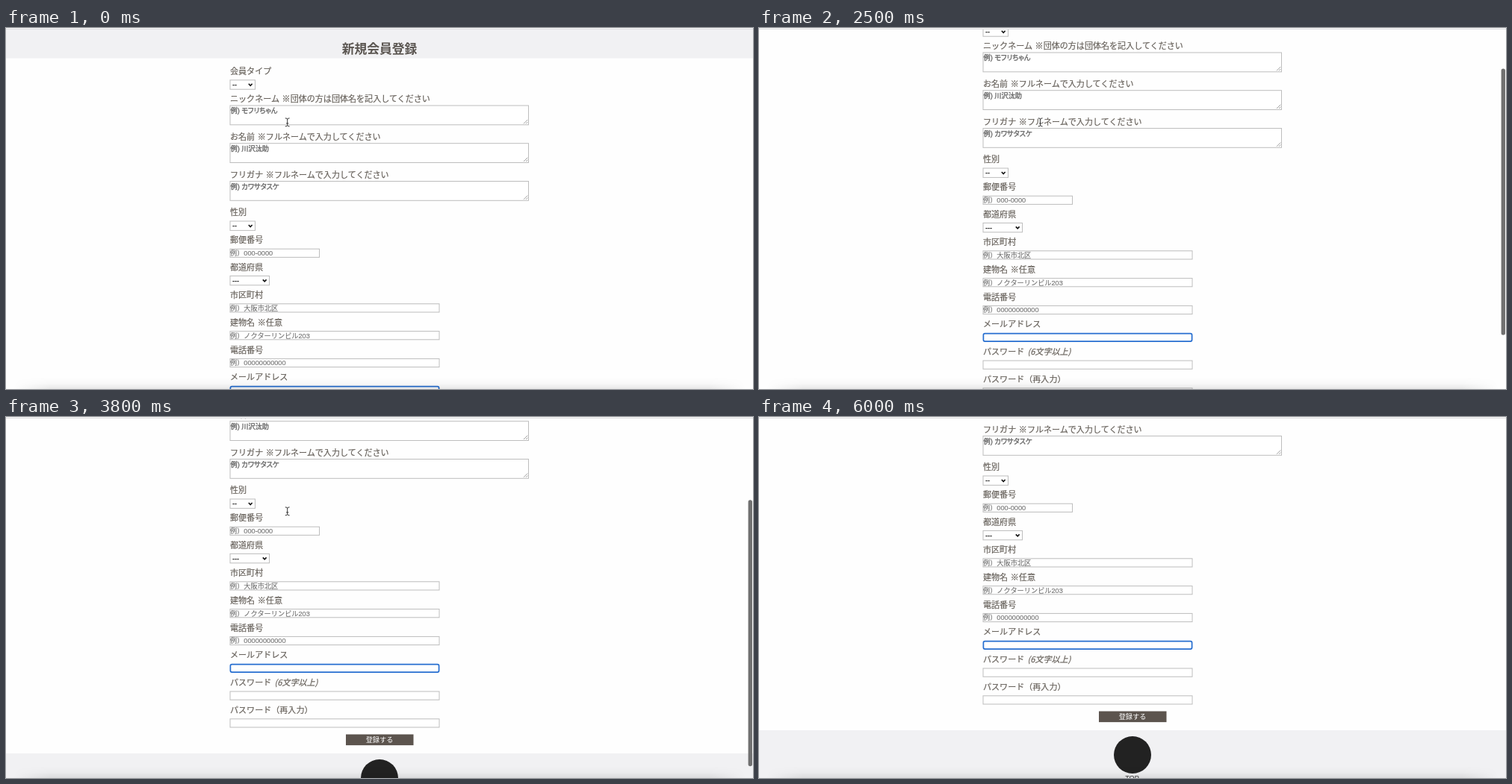
Write an HTML page that moves like this. It is 1000 by 484 pixels and loops after 6100 ms.

```html
<!DOCTYPE html>
<html lang="ja">
<head>
<meta charset="utf-8">
<title>新規会員登録</title>
<style>
html, body { margin: 0; width: 100%; height: 100%; overflow: hidden; background: #fefefe; }
svg { display: block; width: 1000px; height: 484px; }
text { font-family: "Noto Sans CJK JP", "Noto Sans CJK", sans-serif; white-space: pre; }
.title { font-size: 16.8px; font-weight: 700; fill: #5a5550; text-anchor: middle; }
.label { font-size: 11.05px; fill: #66605a; stroke: #66605a; stroke-width: .2; word-spacing: 1.2px; }
.hint { font-family: "Liberation Sans", "Noto Sans CJK JP", sans-serif; font-size: 9.2px; fill: #757575; stroke: #757575; stroke-width: .15; }
.tight { fill: #666; stroke: #666; stroke-width: .35; font-feature-settings: "palt"; }
.pick { font-family: "Liberation Sans", sans-serif; font-size: 9.2px; font-weight: 700; fill: #222; }
.button { font-size: 9.2px; font-weight: 500; fill: #fff; text-anchor: middle; }
.top { font-family: "Liberation Sans", sans-serif; font-size: 9.2px; fill: #333; text-anchor: middle; }
.box { fill: #fff; stroke: #bdbdbd; stroke-width: 1; }
</style>
</head>
<body>
<svg viewBox="0 0 1000 484">
  <defs>
    <linearGradient id="rise" x1="0" y1="0" x2="0" y2="1">
      <stop offset="0" stop-color="#000" stop-opacity="0"/>
      <stop offset=".5" stop-color="#000" stop-opacity=".02"/>
      <stop offset="1" stop-color="#000" stop-opacity=".09"/>
    </linearGradient>
    <linearGradient id="ends">
      <stop offset="0" stop-color="#000"/>
      <stop offset=".05" stop-color="#fff"/>
      <stop offset=".95" stop-color="#fff"/>
      <stop offset="1" stop-color="#000"/>
    </linearGradient>
    <mask id="fade"><rect x="10" y="464" width="980" height="20" fill="url(#ends)"/></mask>
  </defs>
  <rect width="1000" height="484" fill="#fefefe"/>
  <g id="page"></g>
  <rect width="1000" height="1" fill="#f8f8f8"/>
  <rect y="1" width="1000" height="1" fill="#dfdfe1"/>
  <rect x="10" y="468" width="980" height="16" fill="url(#rise)" mask="url(#fade)"/>
  <rect id="thumb" x="993.6" width="5.4" height="357" rx="2.7" fill="#707070"/>
  <g id="cursor" fill="none" stroke-linecap="round">
    <path id="beam" d="M-2.5-5.5Q0-5.5 0-4Q0-5.5 2.5-5.5M0-4V4M-2.5 5.5Q0 5.5 0 4Q0 5.5 2.5 5.5M-1.2 1.5H1.2"/>
  </g>
</svg>
<script>
const LOOP = 6100;
const $ = id => document.getElementById(id);
const page = $('page');

function add(tag, attrs, text) {
  const el = document.createElementNS('http://www.w3.org/2000/svg', tag);
  for (const k in attrs) el.setAttribute(k, attrs[k]);
  if (text) el.textContent = text;
  page.appendChild(el);
  return el;
}
const write = (cls, x, mid, size, text) => add('text', { class: cls, x, y: mid + size * 0.38 }, text);
const label = (y, text) => write('label', 300, y, 11.05, text);
const box = (y, w, h) => add('rect', { class: 'box', x: 300, y, width: w, height: h });

function input(mid, w, hint) {
  box(mid - 5.6, w, 11.2);
  if (hint) write('hint', 300, mid, 9.2, '例）' + hint);
}
function area(y, hint) {
  box(y, 399.5, 25.8);
  write('hint tight', 300.5, y + 7, 9.2, '例) ' + hint);
  add('path', { d: `M693 ${y + 24.3}l5.3-5.3M696 ${y + 24.3}l2.3-2.3`, stroke: '#888', 'stroke-width': 0.8 });
}
function select(mid, w, text) {
  box(mid - 6.2, w, 12.4);
  add('text', { class: 'pick', x: 303, y: mid + 3.2 }, text);
  add('path', { d: `M${291.3 + w} ${mid - 1.2}l2.4 2.5 2.4-2.5`, fill: 'none', stroke: '#111', 'stroke-width': 1.6 });
}

add('rect', { width: 1000, height: 40.5, fill: '#f1f1f3' });
write('title', 500, 28, 16.8, '新規会員登録');

label(58, '会員タイプ');
select(76, 33.5, '--');
label(95, 'ニックネーム ※団体の方は団体名を記入してください');
area(104, 'モフリちゃん');
label(146, 'お名前 ※フルネームで入力してください');
area(154.7, '川沢汰助');
label(196.6, 'フリガナ ※フルネームで入力してください');
area(205.5, 'カワサタスケ');
label(247.3, '性別');
select(265.2, 33.5, '--');

const row = i => 284.2 + 36.8 * i;
['郵便番号', '都道府県', '市区町村', '建物名 ※任意', '電話番号', 'メールアドレス', 'パスワード', 'パスワード（再入力）']
  .forEach((text, i) => label(row(i), text));
const field = i => row(i) + 17.6;
input(field(0), 119.5, '000-0000');
select(field(1), 52.5, '---');
input(field(2), 280, '大阪市北区');
input(field(3), 280, 'ノクターリンビル203');
input(field(4), 280, '00000000000');
const ring = add('rect', {
  x: 300.4, y: field(5) - 5.1, width: 279.2, height: 10.4, rx: 2, fill: '#fff', 'stroke-width': 1.7
});
write('label', 359.6, row(6), 11.05, '(6文字以上)').setAttribute('font-style', 'italic');
input(field(6), 280);
input(field(7), 280);

add('rect', { x: 455, y: 574.5, width: 90.5, height: 14.6, fill: '#5c544e' });
write('button', 500, 581.7, 9.2, '登録する');
add('rect', { y: 600, width: 1000, height: 100, fill: '#f1f1f3' });
add('circle', { cx: 500, cy: 633, r: 25, fill: '#222' });
add('text', { class: 'top', x: 499.5, y: 667 }, 'TOP');

for (const [color, width] of [['#fff', 2.2], ['#333', 1]]) {
  const beam = $('beam').cloneNode();
  beam.removeAttribute('id');
  beam.setAttribute('stroke', color);
  beam.setAttribute('stroke-width', width);
  $('cursor').appendChild(beam);
}

// time in ms, scroll offset in px
const path = [[0, 0], [1600, 0], [1700, 7], [2500, 71], [2900, 100], [3800, 149], [4400, 180], [4600, 182], [5000, 180], [LOOP, 180]];
const clamp = v => Math.max(0, Math.min(1, v));

function scrollAt(t) {
  const i = path.findIndex(p => p[0] > t);
  const [t0, a] = path[i - 1], [t1, b] = path[i];
  return a + (b - a) * (t - t0) / (t1 - t0);
}

function draw(ms) {
  const t = Math.floor((ms % LOOP) / 100) * 100;
  const y = scrollAt(t);
  page.setAttribute('transform', `translate(0 ${-y})`);

  $('thumb').setAttribute('y', 3 + 0.727 * y);
  $('thumb').setAttribute('opacity', t < 1700 ? 0 : clamp((5100 - t) / 300));

  const dull = t < 1800 ? clamp((t - 900) / 400) : 0;
  ring.setAttribute('stroke', `rgb(${38 + 8 * dull},${110 - 8 * dull},${208 - 38 * dull})`);

  const k = clamp((t - 5100) / 500);
  $('cursor').setAttribute('transform', `translate(${376.7 + 22 * k} ${126.4 - 140 * k ** 1.3})`);
}

function tick(now) {
  draw(now);
  requestAnimationFrame(tick);
}
draw(0);
requestAnimationFrame(tick);
</script>
</body>
</html>
```
